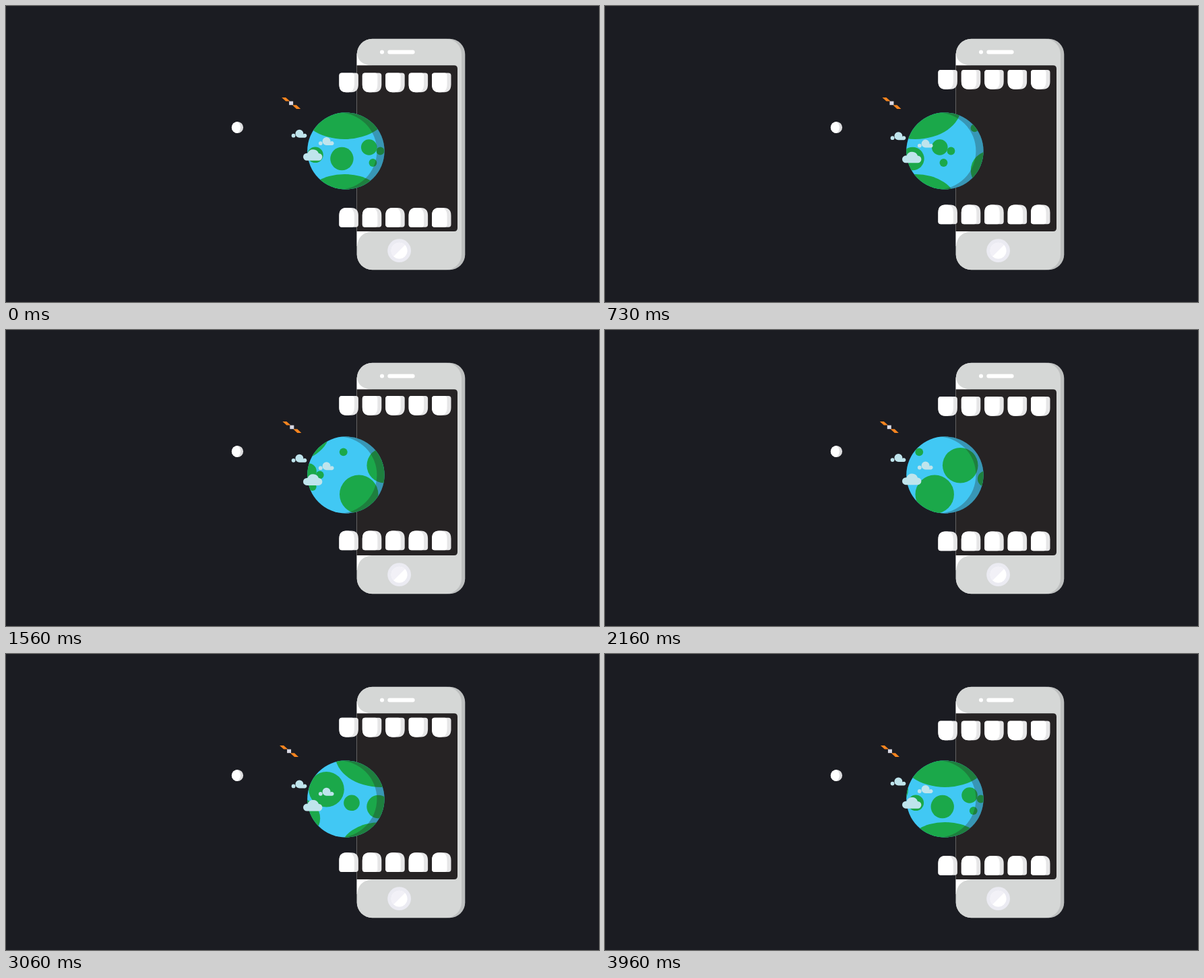
Animation of 880x440 px, one loop 4 s. Source, as an HTML page:

```html
<!DOCTYPE html>
<html lang="en">
<head>
<meta charset="utf-8">
<title>Phone eating a planet</title>
<style>
  html, body { margin: 0; width: 100%; height: 100%; overflow: hidden; background: #1b1c22; }
  svg { display: block; width: 880px; height: 440px; }
</style>
</head>
<body>
<svg viewBox="0 0 880 440" xmlns="http://www.w3.org/2000/svg">
  <defs>
    <clipPath id="globe"><circle cx="504.4" cy="215.5" r="57.2"/></clipPath>
    <clipPath id="moon"><circle cx="343.5" cy="180.5" r="8.6"/></clipPath>
    <clipPath id="body"><rect x="520.7" y="48.7" width="160.6" height="343.6" rx="23"/></clipPath>
    <g id="tooth">
      <path fill="#e6e6e7" d="M4 0H24.5Q28.5 0 28.5 4V17Q28.5 28.7 18 28.7H10.5Q0 28.7 0 17V4Q0 0 4 0Z"/>
      <path fill="#fff" d="M4 0H19Q22.5 0 22.5 4V17Q22.5 28.7 13 28.7H10.5Q0 28.7 0 17V4Q0 0 4 0Z"/>
    </g>
    <g id="land" fill="#1ba84a"></g>
    <g id="puff">
      <path d="M0 -6a6 6 0 0 1 6 6q0 .5 -.2 1a3 3 0 1 1 2.7 5H0a6 6 0 0 1 0 -12Z"/>
      <circle cx="-8.8" cy="3" r="2.9"/>
    </g>
  </defs>

  <rect width="880" height="440" fill="#1b1c22"/>

  <!-- phone -->
  <g clip-path="url(#body)">
    <rect x="520" y="48" width="162" height="345" fill="#bdbfbf"/>
    <rect x="515" y="48.7" width="161" height="343.6" rx="23" fill="#d5d7d6"/>
    <path fill="#fff" d="M520 70H521Q522 87 543 88.5V335H543Q523 337 521 357H520Z"/>
  </g>
  <path fill="#262324" d="M520.5 88.3H665Q670 88.3 670 93.3V330Q670 335 665 335H520.5Z"/>
  <circle cx="558" cy="68.5" r="3" fill="#fff"/>
  <rect x="566.3" y="65.5" width="40.3" height="6" rx="3" fill="#fff"/>
  <circle cx="583.6" cy="363.7" r="17.4" fill="#ebebf2"/>
  <circle cx="583.6" cy="363.7" r="12" fill="#fff"/>
  <path fill="#f2f1f7" d="M575.1 372.2A12 12 0 0 1 592.1 355.2Z"/>

  <!-- moon -->
  <g clip-path="url(#moon)">
    <rect x="334" y="171" width="19" height="19" fill="#dcdcde"/>
    <ellipse cx="340" cy="180.5" rx="8" ry="9.5" fill="#fff"/>
  </g>

  <!-- planet -->
  <g clip-path="url(#globe)">
    <rect x="445" y="156" width="120" height="120" fill="#41c8f4"/>
    <g id="surface"><use href="#land"/><use href="#land" x="230"/></g>
    <path fill="#262324" fill-opacity=".3" fill-rule="evenodd" d="M440 150H570V280H440ZM436 215.5a57.2 57.2 0 1 0 114.4 0a57.2 57.2 0 1 0 -114.4 0Z"/>
  </g>

  <g id="satellite">
    <path fill="#f5841f" d="M-14 -8.5H-8L-1.8 -2.8H-8ZM14 8.5H8L1.8 2.8H8Z"/>
    <rect x="-3" y="-2.8" width="6" height="5.6" fill="#d9d8e3"/>
  </g>

  <g id="clouds" fill="#bfe4ec">
    <use href="#puff" x="435.4" y="189.6"/>
    <use href="#puff" x="475.6" y="201"/>
    <path d="M446.5 218.7q.6 0 1 .1a8.8 8.8 0 0 1 16.5 .1a5.4 5.4 0 0 1 0 10.8H446.5a5.5 5.5 0 0 1 0 -11Z"/>
  </g>

  <g id="teeth"></g>
</svg>
<script>
const LOOP = 4000, WRAP = 230, LEAD = 70;
const $ = id => document.getElementById(id);
const TAU = 2 * Math.PI;

// Continents: cx, cy, rx, ry
const continents = [
  [503, 150, 68, 48], [503, 290, 60, 40],
  [459.5, 221.3, 11.8], [499, 227, 17.2], [539.3, 210, 11.8], [556, 215.5, 5.9],
  [545, 233, 5.9], [591, 181.3, 5.9], [614, 244.2, 28.7], [652, 201.2, 26.3]
];
$('land').innerHTML = continents.map(([cx, cy, rx, ry = rx]) =>
  `<ellipse cx="${cx}" cy="${cy}" rx="${rx}" ry="${ry}"/>`).join('');

$('teeth').innerHTML = Array.from({ length: 5 }, (_, i) => {
  const x = 494.4 + i * 34.4;
  return `<use href="#tooth" transform="translate(${x} 0)"/>` +
    `<use href="#tooth" transform="translate(${x} 229.2) scale(1 -1)"/>`;
}).join('');

const move = (id, x, y) => $(id).setAttribute('transform', `translate(${x.toFixed(2)} ${y.toFixed(2)})`);

function draw(time) {
  const t = time % LOOP;
  const bob = Math.cos(TAU * (t + LEAD) / (LOOP / 2));
  const sway = Math.sin(TAU * (t + LEAD) / LOOP);
  move('surface', -WRAP * t / LOOP - 0.5, 0);
  move('teeth', 0, 97.1 + 2.5 * bob);
  move('clouds', 0, 2 * (1 - bob));
  move('satellite', 422.8 + 2.8 * sway, 144.4);
}

const start = performance.now();
function tick() {
  draw(performance.now() - start);
  requestAnimationFrame(tick);
}
draw(0);
requestAnimationFrame(tick);
</script>
</body>
</html>
```
